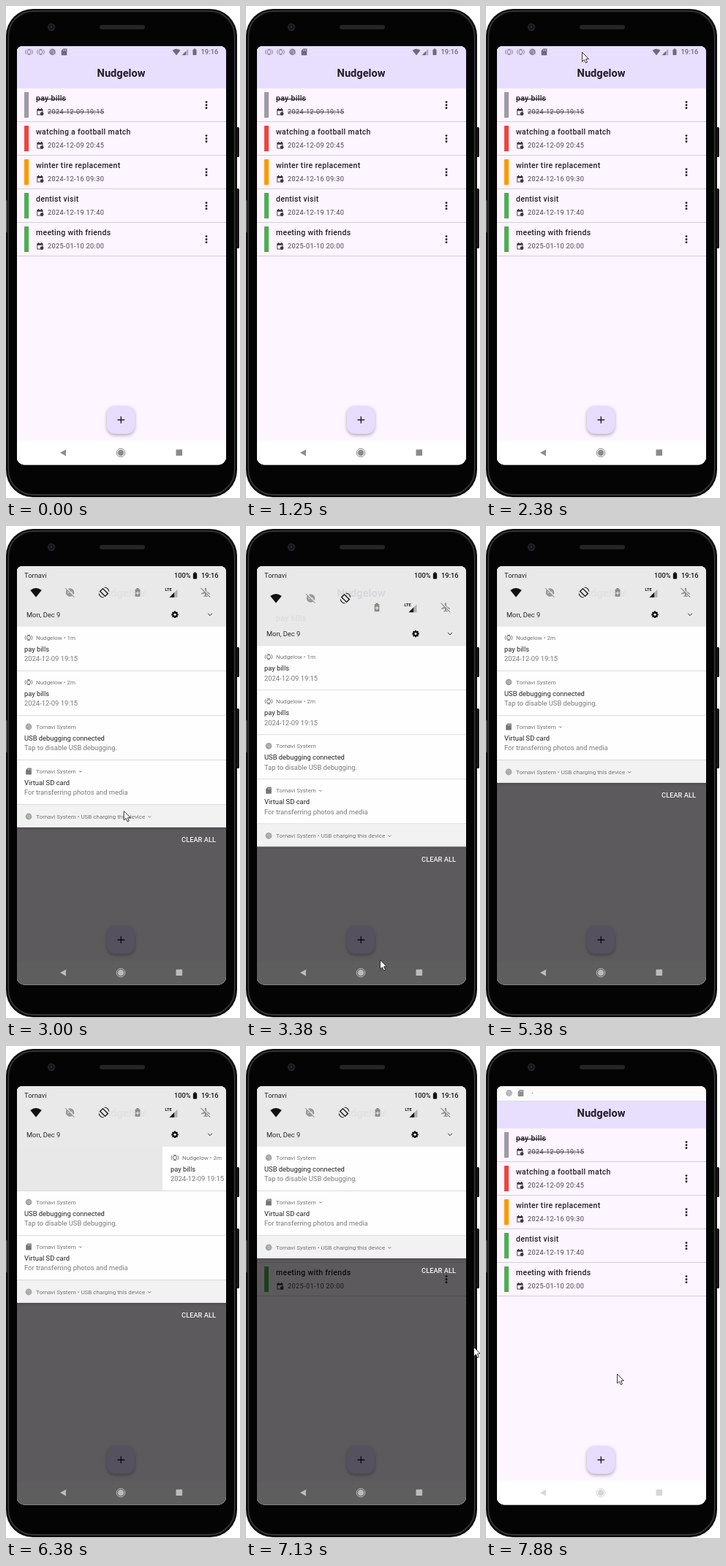
Recreate the animation shown at these times as an HTML page with a canvas. Size 320 by 674 pixels, loop 8000 ms.

```html
<!DOCTYPE html>
<html lang="en">
<head>
<meta charset="utf-8">
<title>Reminder notifications</title>
<style>
html, body { margin: 0; width: 100%; height: 100%; overflow: hidden; background: #fff; }
canvas { display: block; width: 320px; height: 674px; }
</style>
</head>
<body>
<canvas id="stage"></canvas>
<script>
const W = 320, H = 674, LOOP = 8000, STEP = 125;
const APP = 'Nudgelow', OS = 'Tornavi';
const canvas = document.getElementById('stage');
const ctx = canvas.getContext('2d');
const dpr = window.devicePixelRatio || 1;
canvas.width = W * dpr;
canvas.height = H * dpr;

const tasks = [
  ['pay bills', '2024-12-09 19:15', '#9e9a9f'],
  ['watching a football match', '2024-12-09 20:45', '#f0433a'],
  ['winter tire replacement', '2024-12-16 09:30', '#ff9800'],
  ['dentist visit', '2024-12-19 17:40', '#4caf50'],
  ['meeting with friends', '2025-01-10 20:00', '#4caf50']
];

// Piecewise linear track: time, value, time, value, ...
function track(t, k) {
  if (t <= k[0]) return k[1];
  for (let i = 2; i < k.length; i += 2) {
    if (t <= k[i]) {
      const u = (t - k[i - 2]) / (k[i] - k[i - 2]);
      return k[i - 1] + (k[i + 1] - k[i - 1]) * u;
    }
  }
  return k[k.length - 1];
}

// Text placed by the middle of its capitals.
function text(s, x, y, size, color, weight = 400, align = 'left', gap = 0) {
  ctx.font = `${weight} ${size}px Roboto, Arial, sans-serif`;
  ctx.letterSpacing = gap + 'px';
  ctx.textAlign = align;
  ctx.fillStyle = color;
  ctx.fillText(s, x, y + size * 0.355);
  return ctx.measureText(s).width;
}

function rect(x, y, w, h, color, r = 0) {
  ctx.fillStyle = color;
  ctx.beginPath();
  ctx.roundRect(x, y, w, h, r);
  ctx.fill();
}

function disc(x, y, r, color) {
  ctx.fillStyle = color;
  ctx.beginPath();
  ctx.arc(x, y, r, 0, 7);
  ctx.fill();
}

function ring(x, y, r, color, width = 1, from = 0, to = 2 * Math.PI) {
  ctx.strokeStyle = color;
  ctx.lineWidth = width;
  ctx.beginPath();
  ctx.arc(x, y, r, from, to);
  ctx.stroke();
}

function trace(pts) {
  ctx.beginPath();
  for (let i = 0; i < pts.length; i += 2) ctx.lineTo(pts[i], pts[i + 1]);
}

function line(pts, color, width = 1) {
  ctx.strokeStyle = color;
  ctx.lineWidth = width;
  trace(pts);
  ctx.stroke();
}

function poly(pts, color) {
  ctx.fillStyle = color;
  trace(pts);
  ctx.fill();
}

function at(x, y, draw, angle = 0) {
  ctx.save();
  ctx.translate(x, y);
  ctx.rotate(angle);
  draw();
  ctx.restore();
}

const icons = {
  alarm(x, y, c) {
    ring(x, y, 2.6, c, 1);
    ring(x, y, 4.9, c, 0.9, -0.7, 0.7);
    ring(x, y, 4.9, c, 0.9, 2.44, 3.84);
    line([x - 2, y - 3.6, x + 2, y - 3.6], c, 0.9);
    line([x - 2, y + 3.6, x + 2, y + 3.6], c, 0.9);
  },
  system(x, y, c) {
    disc(x, y, 4.4, c);
    line([x - 2.6, y - 1.4, x + 2.4, y + 2.6], 'rgba(255,255,255,.45)', 0.8);
    line([x - 0.6, y - 2.6, x + 3, y + 0.4], 'rgba(255,255,255,.45)', 0.8);
  },
  card(x, y, c) {
    poly([x - 1.4, y - 4.5, x + 3.8, y - 4.5, x + 3.8, y + 4.5, x - 3.8, y + 4.5, x - 3.8, y - 2], c);
    for (let i = 0; i < 3; i++) rect(x - 1.3 + i * 1.6, y - 3.4, 0.7, 1.9, '#ddd');
  },
  wifi(x, y, c, s = 1) {
    ctx.fillStyle = c;
    ctx.beginPath();
    ctx.moveTo(x, y + 5 * s);
    ctx.lineTo(x - 6 * s, y - 2.4 * s);
    ctx.quadraticCurveTo(x, y - 7 * s, x + 6 * s, y - 2.4 * s);
    ctx.fill();
  },
  signal(x, y, c, s = 1) {
    poly([x - 5 * s, y + 5 * s, x + 5 * s, y + 5 * s, x + 5 * s, y - 5 * s], 'rgba(110,110,110,.45)');
    poly([x - 5 * s, y + 5 * s, x + s, y + 5 * s, x + s, y - s], c);
  },
  battery(x, y, c, s = 1) {
    rect(x - 2.8 * s, y - 3.8 * s, 5.6 * s, 8.6 * s, c, 0.7);
    rect(x - 1.3 * s, y - 5 * s, 2.6 * s, 1.6 * s, c);
  },
  chevron(x, y, c, s = 1) {
    line([x - 2 * s, y - s, x, y + s, x + 2 * s, y - s], c, 1);
  },
  calendar(x, y) {
    const c = '#3b373f';
    ctx.strokeStyle = c;
    ctx.lineWidth = 0.9;
    ctx.strokeRect(x - 3.7, y - 3.4, 7.2, 7.4);
    rect(x - 3.7, y - 3.5, 7.2, 2.2, c);
    rect(x - 2.6, y - 4.9, 1.1, 2, c);
    rect(x + 1.5, y - 4.9, 1.1, 2, c);
    disc(x + 2.6, y + 2.6, 2.4, c);
  },
  mute(x, y) {
    const c = '#9a9a9a';
    disc(x, y, 5.8, c);
    rect(x - 3, y - 0.8, 6, 1.6, '#e9e9e9');
    line([x - 5.5, y - 6.5, x + 7, y + 6], '#e9e9e9', 1.6);
    line([x - 6.8, y - 6.2, x + 6, y + 6.6], c, 1.1);
  },
  rotate(x, y) {
    const c = '#242424';
    at(x, y, () => {
      ctx.strokeStyle = c;
      ctx.lineWidth = 1.5;
      ctx.strokeRect(-2.7, -4.8, 5.4, 9.6);
    }, -Math.PI / 4);
    ring(x, y, 7, c, 1.2, -1.5, -0.2);
    ring(x, y, 7, c, 1.2, 1.64, 2.94);
  },
  plane(x, y) {
    const c = '#929292';
    at(x, y, () => {
      rect(-1.1, -6.3, 2.2, 11.6, c, 1.1);
      poly([0, -2.5, 6, 1.4, 6, 2.8, 0, 1, -6, 2.8, -6, 1.4], c);
      poly([0, 3, 2.8, 5.4, 2.8, 6.3, 0, 5.4, -2.8, 6.3, -2.8, 5.4], c);
    });
    line([x - 6, y - 6.5, x + 6.5, y + 6], '#e9e9e9', 2);
    line([x - 6.5, y - 6, x + 6, y + 6.5], c, 1.1);
  },
  gear(x, y) {
    const c = '#111';
    for (let i = 0; i < 4; i++) at(x, y, () => rect(-1.1, -4.7, 2.2, 9.4, c), i * Math.PI / 4);
    ring(x, y, 2.7, c, 2);
    disc(x, y, 1.6, '#e9e9e9');
  }
};

function drawBody() {
  rect(314, 166, 5, 41, '#171717', 1.5);
  rect(314, 250, 5, 82, '#171717', 1.5);
  rect(0, 4, 316, 669, '#0c0c0c', 37);
  ctx.strokeStyle = '#3d3d3d';
  ctx.lineWidth = 1.3;
  ctx.beginPath();
  ctx.roundRect(3.3, 7, 309.4, 662.5, 34);
  ctx.stroke();
  rect(5, 9, 306, 659, '#040404', 32);
  rect(0, 266, 1.5, 44, '#555');
  disc(62, 29, 5.2, '#232326');
  disc(62, 29, 3, '#0d0d10');
  disc(62, 29, 1.4, '#35353d');
  rect(128, 26, 62, 6, '#252525', 3);
}

function drawStatus() {
  const c = '#6f687c';
  icons.alarm(31.5, 63, '#857e92');
  icons.alarm(47.5, 63, '#857e92');
  icons.system(63.5, 63, '#8d8796');
  icons.card(79.5, 63, c);
  icons.wifi(233, 63, c, 0.9);
  icons.signal(245, 63, c, 0.85);
  icons.battery(258, 63, c, 0.9);
  text('19:16', 266.5, 63, 9.4, c, 500);
}

function drawTask([name, date, color], i) {
  const y = 113 + i * 46, done = i === 0;
  rect(25, y + 5, 6, 35, color);
  const w = text(name, 41, y + 13.5, 10.5, '#242028', 500, 'left', 0.3);
  icons.calendar(46.5, y + 32);
  const d = text(date, 57, y + 32, 9.1, '#47434b', 400, 'left', 0.4);
  if (done) {
    rect(41, y + 14, w, 1, '#242028');
    rect(57, y + 31.8, d, 1, '#47434b');
  }
  for (let k = -1; k < 2; k++) disc(274, y + 22.7 + k * 4.1, 1.45, '#242028');
  rect(15, y + 45, 286, 1, '#d5ced8');
}

function drawApp() {
  rect(15, 55, 286, 574, '#fdf5ff');
  rect(15, 55, 286, 58, '#e8dfff');
  text(APP, 157.5, 92, 14.6, '#1e1a24', 700, 'center');
  tasks.forEach(drawTask);
  ctx.save();
  ctx.shadowColor = 'rgba(0,0,0,.3)';
  ctx.shadowBlur = 5 * dpr;
  ctx.shadowOffsetY = 2 * dpr;
  rect(138, 548, 38, 38, '#e8ddff', 11);
  ctx.restore();
  rect(152.5, 566.3, 9.6, 1.4, '#211c2c');
  rect(156.6, 562.2, 1.4, 9.6, '#211c2c');
  rect(15, 595.5, 286, 34, '#fff');
}

function drawNav(shade) {
  const c = `rgb(${shade},${shade},${shade})`;
  poly([74, 612, 82, 607.6, 82, 616.4], c);
  disc(157, 612, 4.3, c);
  ring(157, 612, 5.8, c, 1);
  rect(232.5, 607.5, 8.6, 8.6, c, 0.6);
}

function drawHeader(q) {
  const bottom = 138 + 26.3 * q, left = 91 + 8 * q, right = 91 + 20.5 * q;
  rect(15, 55, 286, bottom - 55, '#e9e9e9');
  text(APP, 157.5, 92, 14.6, `rgba(70,60,90,${0.04 + 0.05 * q})`, 700, 'center');
  if (q) text('pay bills', 41, 126.5, 10.5, `rgba(70,60,90,${0.07 * q})`, 500, 'left', 0.3);
  text(OS, 25, 68, 9.4, '#242424');
  text('100%', 230, 68, 9.2, '#161616', 500);
  icons.battery(258.5, 68, '#111', 0.95);
  text('19:16', 267, 68, 9.3, '#111', 500);

  icons.wifi(41, left, '#111', 1.3);
  icons.mute(87.5 + q, left);
  icons.rotate(134 + 2 * q, left);
  icons.battery(180 - q, right, '#8b8b8b', 1.2);
  rect(179.4 - q, right - 1.6, 1.2, 5, '#e9e9e9');
  rect(177.5 - q, right + 0.3, 5, 1.2, '#e9e9e9');
  icons.signal(229 - q, right + 1.2, '#111', 1.1);
  text('LTE', 217.5 - q, right - 3.8, 5.6, '#111', 700);
  icons.plane(273, right);

  const y = 121.3 + 26.3 * q;
  text('Mon, Dec 9', 28, y, 9.3, '#2b2b2b');
  icons.gear(231 + q, y);
  icons.chevron(279, y, '#222', 1.4);
  return bottom;
}

function drawNote(y, note, h, shift) {
  rect(15, y, 286, h, '#e8e8e8');
  ctx.save();
  ctx.beginPath();
  ctx.rect(15, y, 286, h);
  ctx.clip();
  ctx.translate(shift, 0);
  rect(14, y, 287, h, note.title ? '#fefefe' : '#f2f2f2');
  const line1 = y + (note.title ? 15 : 16);
  const tone = note.icon === 'system' ? '#a5a5a5' : '#757575';
  icons[note.icon](31, line1, tone);
  const w = text(note.head, 41, line1, 8, '#757575');
  if (note.more) icons.chevron(41 + w + 6, line1 + 0.3, '#757575', 0.9);
  if (note.title) {
    text(note.title, 25, y + 30.5, 9.4, '#232323');
    text(note.body, 25, y + 44, 9.4, '#7b7b7b');
  }
  ctx.restore();
  rect(15, y + h - 1, 286, 1, '#dcdcdc');
}

function reminder(age) {
  return { icon: 'alarm', head: `${APP} • ${age}`, title: 'pay bills', body: '2024-12-09 19:15' };
}

const system = OS + ' System';
const notes = [
  reminder('1m'),
  reminder('2m'),
  { icon: 'system', head: system, title: 'USB debugging connected', body: 'Tap to disable USB debugging.' },
  { icon: 'card', head: system, more: true, title: 'Virtual SD card', body: 'For transferring photos and media' },
  { icon: 'system', head: system + ' • USB charging this device', more: true }
];

function drawShade(p, q, heights, shifts) {
  const full = 83 + 26.3 * q + heights.reduce((a, b) => a + b, 0);
  const h = full * p;
  ctx.save();
  ctx.shadowColor = 'rgba(0,0,0,.45)';
  ctx.shadowBlur = 4 * dpr;
  rect(15, 55, 286, h, '#f6f6f6');
  ctx.restore();
  ctx.save();
  ctx.beginPath();
  ctx.rect(15, 55, 286, h);
  ctx.clip();
  ctx.translate(0, -50 * (1 - p));
  let y = drawHeader(q);
  notes.forEach((n, i) => {
    if (heights[i] > 0.5) drawNote(y, n, heights[i], shifts[i] || 0);
    y += heights[i];
  });
  ctx.restore();
  if (p === 1) text('CLEAR ALL', 287, 55 + full + 17, 9.3, '#f4f4f4', 500, 'right');
}

// Last moment of closing: a pale strip with the remaining icons.
function drawStrip() {
  rect(15, 55, 286, 21, '#fbfafc');
  rect(15, 75, 286, 1, '#ddd8e4');
  icons.system(31.5, 64.5, '#b3b1b5');
  icons.card(47.5, 64.5, '#8f8d92');
  disc(63.5, 64.5, 0.8, '#a5a3a8');
}

function drawCursor(t) {
  const shown = (t >= 1625 && t < 4250) || t >= 7125;
  if (!shown) return;
  const late = t >= 7125;
  const x = late ? track(t, [7125, 311, 7500, 179])
    : track(t, [1625, 272, 2375, 131, 2500, 131, 3375, 183, 3500, 182, 4250, 60]);
  const y = late ? track(t, [7125, 412, 7500, 449])
    : track(t, [1625, 187, 2375, 63, 2500, 63, 2750, 170, 3125, 500, 3375, 594, 3500, 585, 4250, 165]);
  at(x, y, () => {
    trace([0.5, 0.5, 0.5, 13, 3.4, 10.5, 5.4, 15, 7.5, 14, 5.5, 9.8, 9.4, 9.5]);
    ctx.closePath();
    ctx.fillStyle = '#fff';
    ctx.fill();
    ctx.strokeStyle = '#222';
    ctx.lineWidth = 0.9;
    ctx.stroke();
  });
}

function draw(t) {
  const open = t < 5000
    ? track(t, [2500, 0, 2625, 0.08, 2750, 0.32, 2875, 0.66, 3000, 1])
    : track(t, [7500, 1, 7625, 0.8, 7750, 0.4, 7875, 0]);
  const over = track(t, [3000, 0, 3375, 1, 3500, 0.75, 3875, 0]);
  const heights = [
    track(t, [5000, 61, 5125, 42, 5250, 12, 5375, 0]),
    track(t, [6750, 61, 6875, 42, 7000, 12, 7125, 0]),
    61, 61, 31
  ];
  const shifts = [
    track(t, [4250, 0, 4375, 8, 4500, 36, 4625, 83, 4750, 200, 4875, 200, 5000, 287]),
    track(t, [5750, 0, 5875, 8, 6000, 34, 6125, 83, 6250, 150, 6375, 200, 6625, 200, 6750, 287])
  ];
  const strip = t >= 7875;

  ctx.setTransform(dpr, 0, 0, dpr, 0, 0);
  ctx.fillStyle = '#fff';
  ctx.fillRect(0, 0, W, H);
  drawBody();

  ctx.save();
  ctx.beginPath();
  ctx.roundRect(14.5, 55, 286.5, 573.5, [8, 8, 11, 11]);
  ctx.clip();
  drawApp();
  if (open > 0) {
    rect(14, 55, 288, 575, `rgba(0,0,0,${0.63 * Math.min(1, open * 1.4)})`);
    drawNav(Math.round(140 + 46 * open));
    drawShade(open, over, heights, shifts);
  } else {
    drawNav(strip ? 214 : 140);
    if (strip) drawStrip();
    else drawStatus();
  }
  ctx.restore();
  drawCursor(t);
}

function tick(now) {
  draw(Math.floor(now % LOOP / STEP) * STEP);
  requestAnimationFrame(tick);
}
requestAnimationFrame(tick);
</script>
</body>
</html>
```
